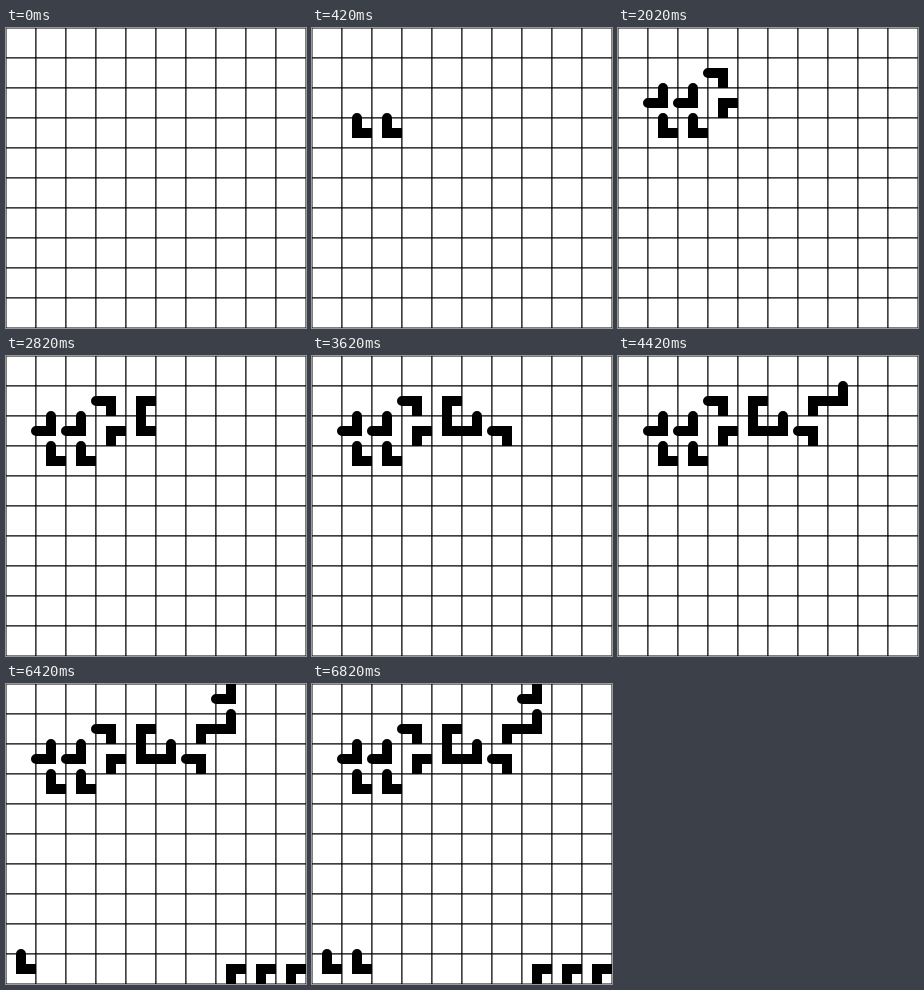
An HTML page with a canvas that plays this animation: 300 by 300 pixels, repeating every 7200 ms.

```html
<!DOCTYPE html>
<html lang="en">
<head>
<meta charset="utf-8">
<title>Corner tiles</title>
<style>
  html, body { margin: 0; width: 100%; height: 100%; overflow: hidden; background: #fff; }
  canvas { display: block; }
</style>
</head>
<body>
<canvas id="stage" width="300" height="300"></canvas>
<script>
const ctx = document.getElementById('stage').getContext('2d');
const CELL = 30, COUNT = 10, LOOP = 7200, STEP = 400;

// Column, row and the two open sides of each tile, in order of appearance.
const tiles = ('23TR 13TR 12LT 22LT 32RB 31LB 41RB 42TR 52LT ' +
  '62LB 61RB 71LT 70LT 79RB 89RB 99RB 09TR 19TR').split(' ');
const sides = { T: [0, -1], R: [1, 0], B: [0, 1], L: [-1, 0] };

function drawCorner(x, y, [from, to]) {
  const half = CELL / 2, cx = x + half, cy = y + half;
  const edge = side => [cx + sides[side][0] * half, cy + sides[side][1] * half];
  ctx.lineWidth = 10;
  ctx.beginPath();
  ctx.moveTo(...edge(from));
  ctx.lineTo(cx, cy);
  ctx.lineTo(...edge(to));
  ctx.stroke();
}

// Each cell paints over whatever spilled in from the left or from above.
function drawGrid(shown) {
  const corners = new Map(tiles.slice(0, shown).map(t => [t.slice(0, 2), t.slice(2)]));
  ctx.fillStyle = '#fff';
  ctx.strokeStyle = '#000';
  ctx.lineCap = 'round';
  ctx.lineJoin = 'miter';
  for (let row = 0; row < COUNT; row++) {
    for (let col = 0; col < COUNT; col++) {
      const x = col * CELL, y = row * CELL, corner = corners.get(`${col}${row}`);
      ctx.lineWidth = 1;
      ctx.fillRect(x, y, CELL, CELL);
      ctx.strokeRect(x, y, CELL, CELL);
      if (corner) drawCorner(x, y, corner);
    }
  }
}

function shownAt(time) {
  if (time < 40) return 0;
  return time < 420 ? 1 : 2 + Math.floor((time - 420) / STEP);
}

let drawn = -1;
function tick() {
  const shown = shownAt(performance.now() % LOOP);
  if (shown !== drawn) {
    ctx.clearRect(0, 0, 300, 300);
    drawGrid(shown);
    drawn = shown;
  }
  requestAnimationFrame(tick);
}
tick();
</script>
</body>
</html>
```
